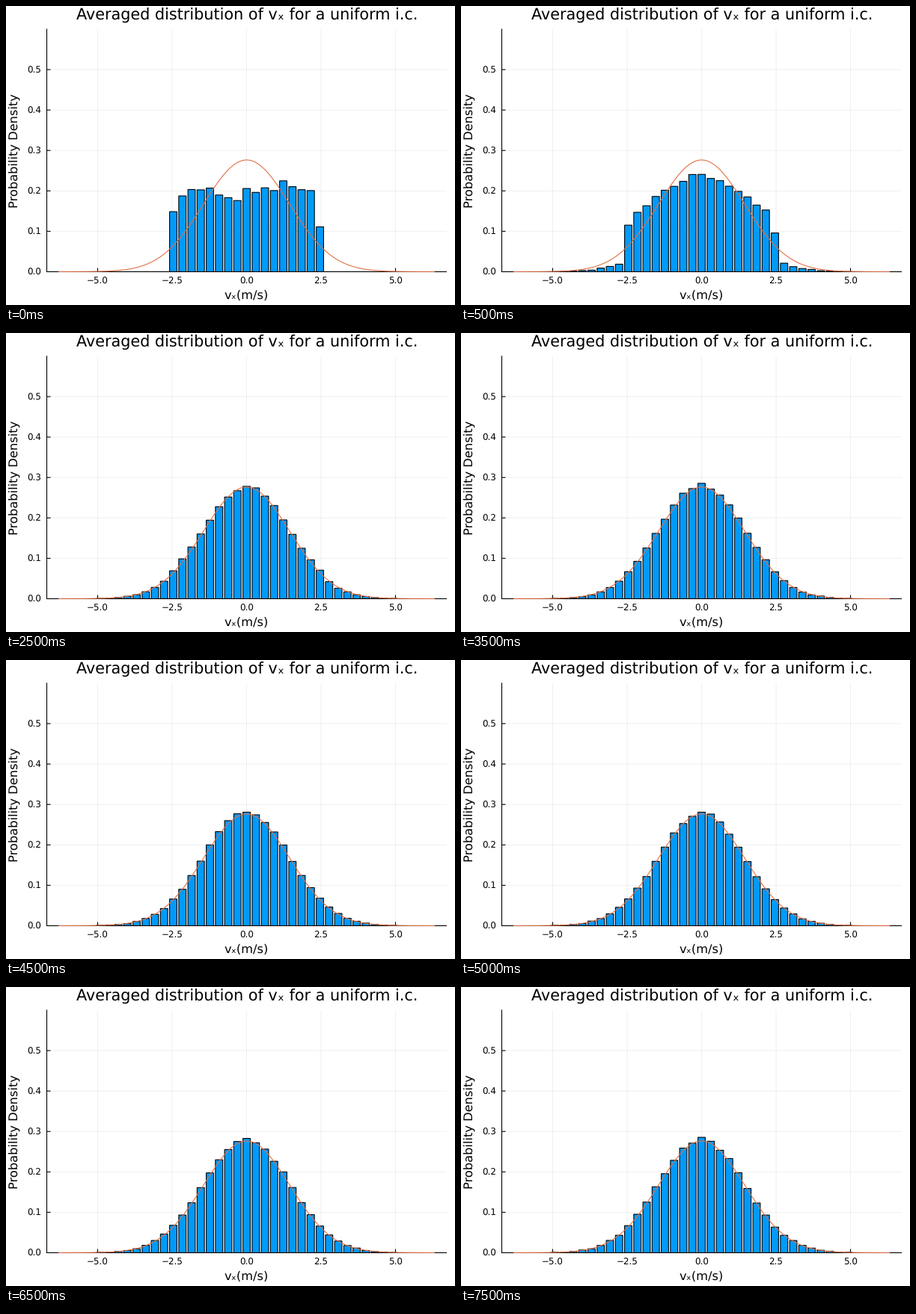
Write a matplotlib script that moves like this. It is 600 px wide and 400 px high and loops after 8 s.

```python
import numpy as np
import matplotlib.pyplot as plt
from matplotlib.animation import FuncAnimation

W, H, DPI = 600, 400, 100
FRAMES, INTERVAL = 16, 500
LEFT, RIGHT, TOP, BASE = 54.5, 588.5, 31, 355.5
X0, X_UNIT = 321.5, 39.8
Y_MAX = 0.6
STEP = 12.25 / X_UNIT
SIGMA = 1.443
V_LOW, V_HIGH, LEVEL = -2.56, 2.49, 0.2

plt.rcParams.update({
    "font.family": "DejaVu Sans",
    "text.hinting": "none",
    "path.snap": False,
})


def pt(px):
    return px * 72 / DPI


def maxwell(v):
    return np.exp(-v**2 / (2 * SIGMA**2)) / (SIGMA * np.sqrt(2 * np.pi))


def box(v):
    """Uniform density averaged over a bin centred on v."""
    right = np.clip(v + STEP / 2, V_LOW, V_HIGH)
    left = np.clip(v - STEP / 2, V_LOW, V_HIGH)
    return LEVEL * (right - left) / STEP


centers = np.arange(-16, 17) * STEP


def density(n):
    """Relax from the box to the Gaussian; sampling noise shrinks quickly."""
    keep = np.exp(-0.6 * n)
    mean = keep * box(centers) + (1 - keep) * 1.02 * maxwell(centers)
    noise = np.random.default_rng(40 + n).normal(size=centers.size)
    spread = 0.006 + 0.034 * np.exp(-2.5 * n)
    return np.maximum(mean + spread * np.sqrt(mean) * np.clip(noise, -1.5, 1.5), 0)


fig = plt.figure(figsize=(W / DPI, H / DPI), dpi=DPI, facecolor="white")
ax = fig.add_axes([LEFT / W, 1 - BASE / H, (RIGHT - LEFT) / W, (BASE - TOP) / H])
ax.set_xlim((LEFT - X0) / X_UNIT, (RIGHT - X0) / X_UNIT)
ax.set_ylim(0, Y_MAX)
ax.spines[["top", "right"]].set_visible(False)
ax.spines[["left", "bottom"]].set_linewidth(pt(1.1))

xticks = np.arange(-5, 5.1, 2.5)
yticks = np.arange(6) / 10
ax.set_xticks(xticks, [f"{x:.1f}".replace("-", "\u2212") for x in xticks])
ax.set_yticks(yticks, [f"{y:.1f}" for y in yticks])
ax.tick_params(length=0, labelsize=pt(11.85))
ax.tick_params(axis="x", pad=pt(7))
ax.tick_params(axis="y", pad=pt(7.5))
ax.set_axisbelow(True)
ax.grid(color="black", alpha=0.06, linewidth=pt(1))

# Inward tick marks, five pixels long
tick_style = dict(color="black", linewidth=pt(1.1), zorder=1.5)
x_min = ax.get_xlim()[0]
ax.vlines(xticks, 0, 5 * Y_MAX / (BASE - TOP), **tick_style)
ax.hlines(yticks, x_min, x_min + 5 / X_UNIT, **tick_style)


def label(x, y, text, size, **kw):
    fig.text(x / W, 1 - y / H, text, fontsize=pt(size), ha="center",
             va="baseline", rotation_mode="anchor", **kw)


label(322.6, 18.8, "Averaged distribution of v\u2093 for a uniform i.c.", 20.74)
label(X0, 392, "v\u2093(m/s)", 16.3)
label(16, 193.5, "Probability Density", 16.3, rotation=90)

bars = ax.bar(centers, density(0), width=0.8 * STEP, color="#009af9",
              edgecolor="black", linewidth=pt(1.1), zorder=2)
v = np.linspace(-6.3, 6.3, 300)
ax.plot(v, maxwell(v), color="#e26f46", linewidth=pt(1.1), zorder=3)


def update(n):
    for bar, height in zip(bars, density(n)):
        bar.set_height(height)
    return list(bars)


anim = FuncAnimation(fig, update, frames=FRAMES, interval=INTERVAL,
                     repeat=True, repeat_delay=0, blit=False)
plt.show()
```
